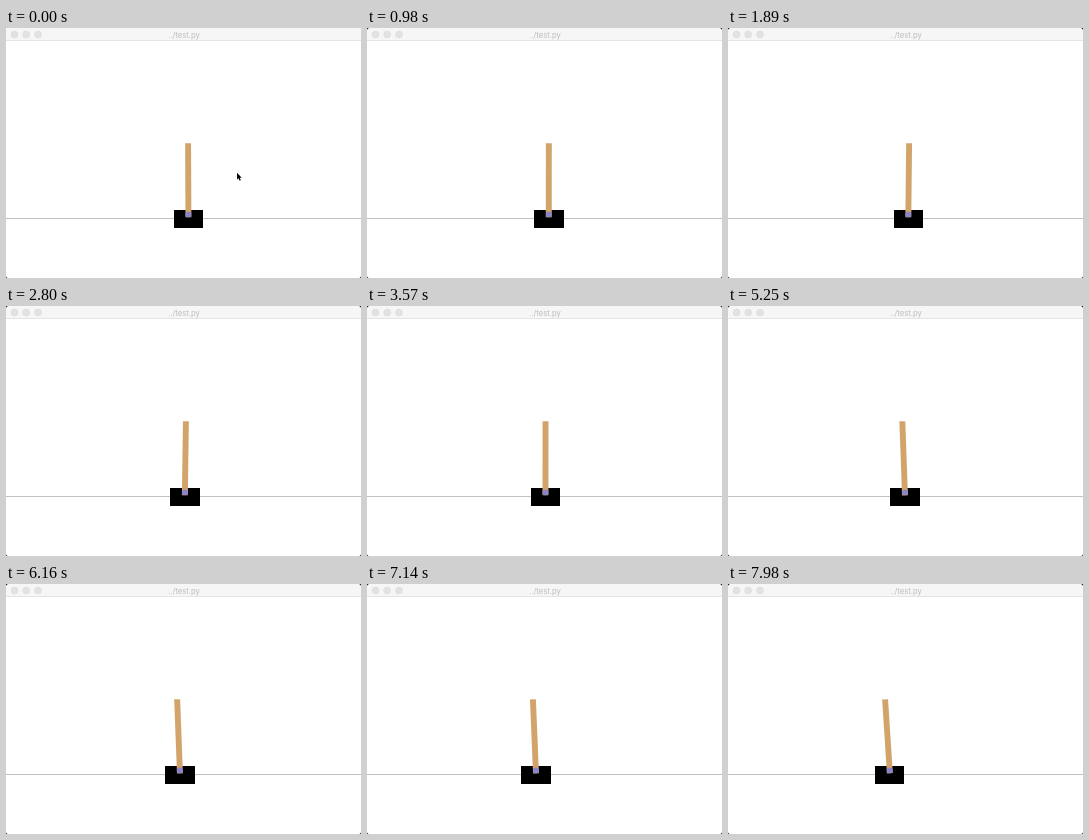
Animation of 355x250 px, one loop 8 s. Source, as an HTML page:

```html
<!DOCTYPE html>
<html lang="en">
<head>
<meta charset="utf-8">
<title>../test.py</title>
<style>
  html, body { margin: 0; width: 100%; height: 100%; overflow: hidden; background: #fff; }
  svg { display: block; width: 100vw; height: 100vh; }
  text { font: 7.7px Inter, "Liberation Sans", sans-serif; fill: #bcbcbc; text-anchor: middle; }
</style>
</head>
<body>
<svg viewBox="0 0 355 250">
  <rect width="355" height="250" fill="#fff"/>
  <rect width="355" height="12" fill="#f6f6f6"/>
  <rect y="12" width="355" height="1" fill="#e4e4e4"/>
  <g fill="#e2e2e2" stroke="#d9d9d9" stroke-width=".5">
    <circle cx="8.5" cy="6.5" r="3.5"/>
    <circle cx="20.2" cy="6.5" r="3.5"/>
    <circle cx="32" cy="6.5" r="3.5"/>
  </g>
  <text x="178" y="9.8">../test.py</text>
  <path d="M0 248.5V250H1.5ZM355 248.5V250H353.5Z" fill="#333"/>
  <path id="corners" d="M0 0H1.8L0 1.8ZM355 0H353.2L355 1.8Z" fill="#222"/>
  <rect y="190" width="355" height="1" fill="#c0c0c0"/>
  <g id="cart">
    <rect x="-14.8" y="181.9" width="29.6" height="17.7" shape-rendering="crispEdges"/>
    <g id="pole">
      <rect x="-2.96" y="115.2" width="5.92" height="74.1" fill="#d2a46c"/>
    </g>
    <circle cy="186.4" r="2.96" fill="#8a84cc"/>
  </g>
  <path id="cursor" d="M231 144.7V151.6L232.5 150.2L233.6 152.8L234.8 152.3L233.7 149.8H235.7Z"/>
</svg>
<script>
  const LOOP = 8000, STEP = 70, PIVOT = 186.4, LENGTH = 71;

  const $ = id => document.getElementById(id);

  // Seconds to x: a slow leftward drift that runs away near the end
  const tipX = s => 182.1 - 0.28 * s ** 2 - 7.4 * (s / 8) ** 12;

  // The cart also sways once a second while it balances the pole
  function cartX(s) {
    const fall = (s / 8) ** 8;
    const sway = 1.3 * (1 - fall) * Math.sin(2 * Math.PI * s);
    return 182.4 - 0.3 * s - 0.18 * s ** 2 - 7 * fall + sway;
  }

  function draw(now) {
    const time = now % LOOP;
    const started = time >= 2 * STEP;
    const s = started ? Math.floor(time / STEP) * STEP / 1000 : 0;
    const x = cartX(s);
    const angle = Math.asin((tipX(s) - x) / LENGTH) * 180 / Math.PI;
    $("cart").setAttribute("transform", `translate(${x.toFixed(2)} 0)`);
    $("pole").setAttribute("transform", `rotate(${angle.toFixed(3)} 0 ${PIVOT})`);
    $("cursor").style.display = started ? "none" : "";
    $("corners").style.display = started ? "" : "none";
  }

  const start = performance.now();
  function tick() {
    draw(performance.now() - start);
    requestAnimationFrame(tick);
  }
  tick();
</script>
</body>
</html>
```
